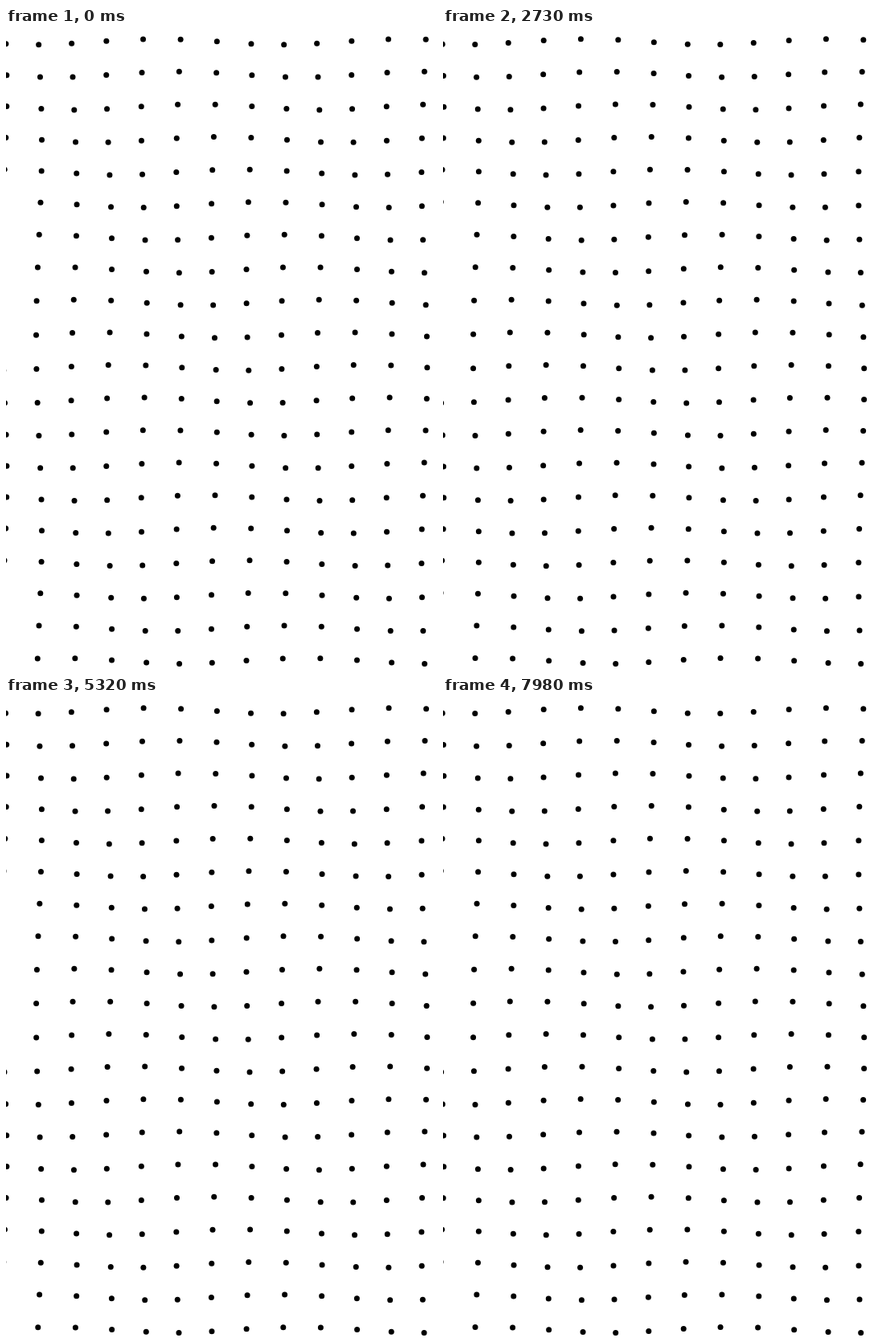
Write an HTML page with a canvas that moves like this. It is 536 px wide and 798 px high and loops after 8000 ms.

```html
<!DOCTYPE html>
<html lang="en">
<head>
<meta charset="utf-8">
<title>Dot wave</title>
<style>
  html, body { margin: 0; width: 100%; height: 100%; overflow: hidden; background: #fff; }
  canvas { display: block; width: 536px; height: 798px; }
</style>
</head>
<body>
<canvas id="stage" width="536" height="798"></canvas>
<script>
  const TAU = Math.PI * 2;
  const LOOP = 8000, STEP = 70, PERIOD = 2625;
  const COLS = 13, ROWS = 20;
  const LEFT = -2.55, TOP = 17.3, GAP_X = 43.57, GAP_Y = 40.56;
  const SWING = 3.5, RADIUS = 3.5;
  const START = -0.1 + TAU / 7, PHASE_X = -TAU / 7, PHASE_Y = 0.529;

  const ctx = document.getElementById('stage').getContext('2d');

  // Every dot circles its grid point, with the phase shifting across the grid.
  function draw(time) {
    const turn = START - TAU * time / PERIOD;
    ctx.fillStyle = '#fff';
    ctx.fillRect(0, 0, 536, 798);
    ctx.fillStyle = '#000';
    for (let row = 0; row < ROWS; row++) {
      for (let col = 0; col < COLS; col++) {
        const angle = turn + col * PHASE_X + row * PHASE_Y;
        const x = LEFT + col * GAP_X + SWING * Math.sin(angle);
        const y = TOP + row * GAP_Y + SWING * Math.cos(angle);
        ctx.beginPath();
        ctx.arc(x, y, RADIUS, 0, TAU);
        ctx.fill();
      }
    }
  }

  const begin = performance.now();
  function tick() {
    const time = (performance.now() - begin) % LOOP;
    draw(Math.floor(time / STEP) * STEP);
    requestAnimationFrame(tick);
  }
  tick();
</script>
</body>
</html>
```
